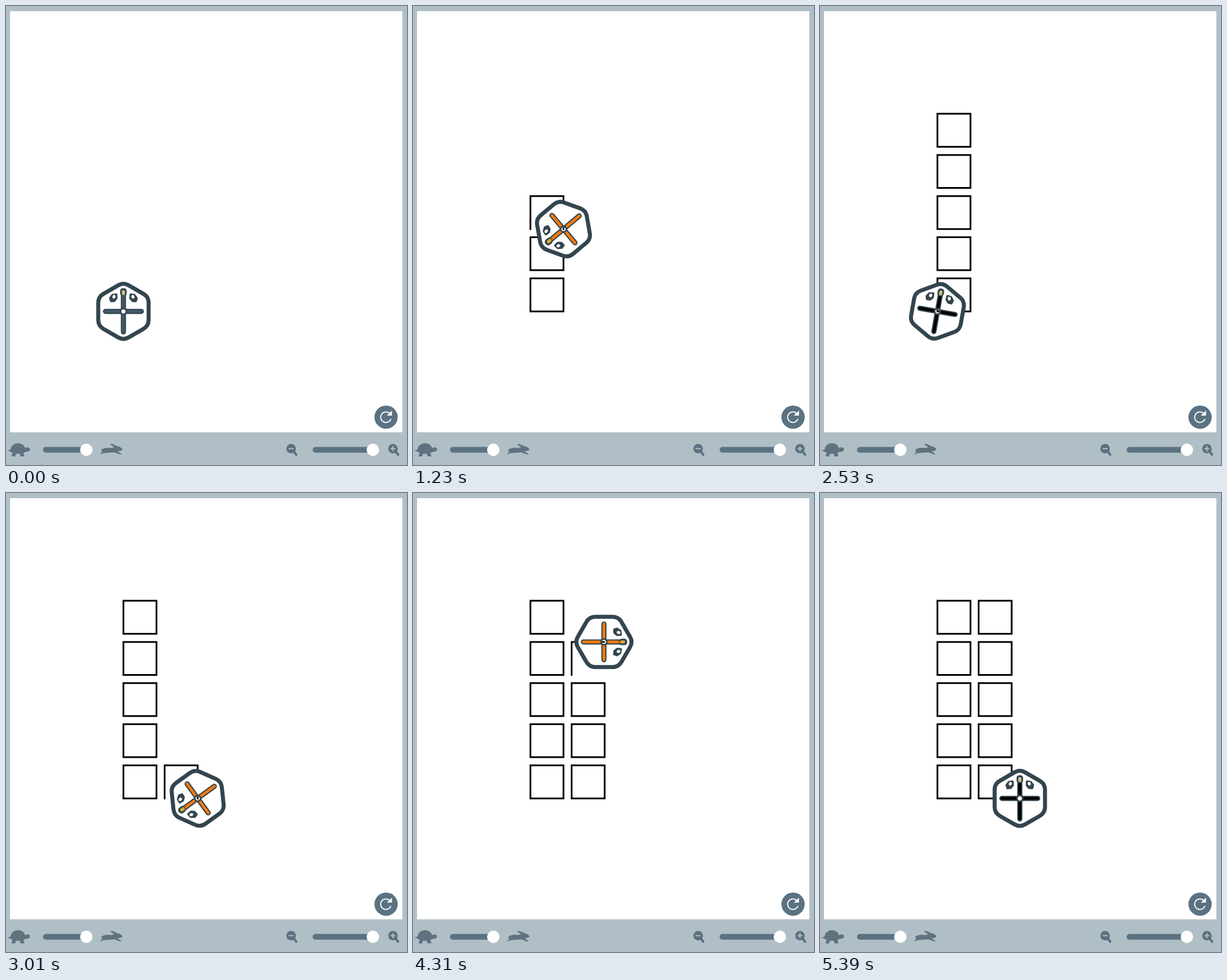
An HTML page for the animation above (6.25 s loop, 699 by 801 pixels).

```html
<!DOCTYPE html>
<html lang="en">
<head>
<meta charset="utf-8">
<title>Drawing robot</title>
<style>
  html, body { margin: 0; width: 100%; height: 100%; overflow: hidden; background: #b0bfc6; }
  svg { display: block; width: 100%; height: 100%; }
  .trail { fill: none; stroke: #000; stroke-width: 3; stroke-linecap: square; }
  .bar { fill: none; stroke-linecap: round; }
</style>
</head>
<body>
<svg viewBox="0 0 699 801">
  <defs>
    <clipPath id="hole"><circle id="holeShape" r="3.6"/></clipPath>
    <g id="eye">
      <path d="M-19-28.5L-12.7-29.3L-12.3-23L-16-18.5L-21.5-18L-23-23Z" fill="#33454e" stroke="#33454e" stroke-width="4" stroke-linejoin="round"/>
      <ellipse cx="-16.5" cy="-25.5" rx="2.6" ry="3.3" transform="rotate(15 -16.5 -25.5)" fill="#fff"/>
    </g>
    <g id="lens">
      <path d="M4 4L9 10.5" stroke="#5a7080" stroke-width="4" stroke-linecap="round"/>
      <circle r="8.3" fill="#5a7080"/>
    </g>
  </defs>
  <rect width="699" height="801" fill="#b0bfc6"/>
  <rect x="7" y="9" width="684" height="735" fill="#fff"/>

  <path id="trail" class="trail"/>
  <g id="robot">
    <path id="shell" fill="#fff" stroke="#33454e" stroke-width="7"/>
    <use href="#eye"/>
    <use href="#eye" transform="scale(-1 1)"/>
    <path class="bar" d="M-31.2 0H31.2M0-34V35.8" stroke="#33454e" stroke-width="9"/>
    <rect x="-5.7" y="-40.5" width="11.4" height="14" rx="5" fill="#33454e"/>
    <path id="lights" class="bar" d="M-31.2 0H31.2M0-25V35.8" stroke-width="4.8"/>
    <rect id="lamp" x="-2.7" y="-36.8" width="5.4" height="8.4" rx="2"/>
    <circle r="6.3" fill="#33454e"/>
    <circle r="3.6" fill="#fff"/>
  </g>
  <g clip-path="url(#hole)"><path id="trailInHole" class="trail"/></g>

  <circle cx="662.5" cy="717.5" r="20.3" fill="#5a7282"/>
  <path d="M669 711.2A9.2 9.2 0 1 0 671 720.5" fill="none" stroke="#fff" stroke-width="1.8"/>
  <path d="M663.8 714.8L672.8 706V714.8Z" fill="#fff"/>

  <path class="bar" d="M69.5 774.5H140M539.5 774.5H639" stroke="#5a7282" stroke-width="10"/>
  <circle cx="140" cy="774.5" r="10.7" fill="#fff"/>
  <circle cx="639.5" cy="774.5" r="10.7" fill="#fff"/>

  <g fill="#607280">
    <path d="M2.5 776L8 774C9 767 14 763 21 763C28 763 32 767 33.5 772C35 770 38 769.5 40.5 771C43 773 42 777 38.5 777.5L33 778.5L30.5 780L32 786H25.5L24 781.5H17L16 786H9.5L11.5 780L7.5 777.5Z"/>
    <path d="M163.5 783L168 777L165.5 775.5C169 771 176 770.5 182 771.5L189 770L183 766.5C181 765 183 764 186 764.5L195 768.5C199 769 203 772 203 774.5L199 776.5L194 777L201 781.5L200 783L189 779L179 779.5L169 780.5Z"/>
  </g>
  <use href="#lens" x="497" y="772.5"/>
  <use href="#lens" x="674.5" y="772.5"/>
  <path d="M492.5 772.5H501.5M670 772.5H679M674.5 768V777" stroke="#b0bfc6" stroke-width="2.2"/>
</svg>
<script>
const LOOP = 6250, TICK = 77, LAST_TICK = 70;
// Lengths in pixels.
const LEFT = 204.7, BOTTOM = 532.9, PITCH = 71.8, SIDE = 57.6, ROWS = 5;
// Durations in ticks.
const START = 1.38, MOVE = 0.45, CELL = 6.06, COLUMN = 35.1;
const SQUARE = 8 * MOVE, GAP_WAIT = 1.1, RETURN_WAIT = 1.73, BACK = 2;

const el = id => document.getElementById(id);
const ramp = (time, start, length) => Math.min(1, Math.max(0, (time - start) / length));

function roundedHexagon(halfWidth, radius) {
  const corner = halfWidth / Math.cos(Math.PI / 6);
  const cut = radius * Math.tan(Math.PI / 6) / corner;
  const vertex = k => [corner * Math.sin(k * Math.PI / 3), -corner * Math.cos(k * Math.PI / 3)];
  const toward = (a, b) => a.map((v, i) => (v + (b[i] - v) * cut).toFixed(2)).join(' ');
  let d = '';
  for (let k = 0; k < 6; k++) {
    const [before, at, after] = [vertex(k - 1), vertex(k), vertex(k + 1)];
    d += `${k ? 'L' : 'M'}${toward(at, before)}A${radius} ${radius} 0 0 1 ${toward(at, after)}`;
  }
  return d + 'Z';
}

const squareAt = (column, row) =>
  `M${LEFT + column * PITCH} ${BOTTOM - row * PITCH}v${-SIDE}h${SIDE}v${SIDE}h${-SIDE}z`;

function pose(tick) {
  const since = tick - START;
  const column = since < COLUMN ? 0 : 1;
  const inColumn = since - column * COLUMN;
  const row = Math.min(ROWS - 1, Math.max(0, Math.floor(inColumn / CELL)));
  const t = inColumn - row * CELL;
  const side = i => SIDE * ramp(t, 2 * i * MOVE, MOVE);
  const lengths = [0, 1, 2, 3].map(side);

  let x = LEFT + column * PITCH + lengths[1] - lengths[3];
  let y = BOTTOM - row * PITCH - lengths[0] + lengths[2];
  let heading = 0;
  for (let i = 0; i < 4; i++) heading += 90 * ramp(t, (2 * i + 1) * MOVE, MOVE);

  const rest = t - SQUARE;
  y -= PITCH * ramp(rest, GAP_WAIT, MOVE);
  if (row === ROWS - 1) {
    const turn = RETURN_WAIT + BACK;
    y += ROWS * PITCH * ramp(rest, RETURN_WAIT, BACK);
    x += PITCH * ramp(rest, turn + MOVE, MOVE);
    heading += 90 * (ramp(rest, turn, MOVE) - ramp(rest, turn + 2 * MOVE, MOVE));
  }

  let trail = '';
  for (let c = 0; c <= column; c++)
    for (let r = 0; r < (c < column ? ROWS : row); r++) trail += squareAt(c, r);
  if (rest >= 0) trail += squareAt(column, row);
  else if (t > 0) {
    trail += `M${LEFT + column * PITCH} ${BOTTOM - row * PITCH}`;
    const steps = [`v${-lengths[0]}`, `h${lengths[1]}`, `v${lengths[2]}`, `h${-lengths[3]}`];
    trail += steps.filter((_, i) => lengths[i] > 0).join('');
  }

  const lead = 0.3;
  const next = row < ROWS - 1 ? CELL : COLUMN - row * CELL;
  const penDown = (t > -lead && rest < MOVE) || t > next - lead;
  return { x, y, heading, trail, penDown };
}

function draw(time) {
  const tick = Math.min(LAST_TICK, Math.floor((time + 17) / TICK));
  const { x, y, heading, trail, penDown } = pose(tick);
  el('robot').setAttribute('transform', `translate(${x} ${y}) rotate(${heading})`);
  el('trail').setAttribute('d', trail);
  el('trailInHole').setAttribute('d', trail);
  el('holeShape').setAttribute('cx', x);
  el('holeShape').setAttribute('cy', y);
  el('lights').setAttribute('stroke', penDown ? '#f27a0c' : tick ? '#000' : '#435a66');
  el('lamp').setAttribute('fill', penDown ? '#dfa92c' : '#d0c078');
}

el('shell').setAttribute('d', roundedHexagon(43.9, 18));
const begin = performance.now();
function loop() {
  draw((performance.now() - begin) % LOOP);
  requestAnimationFrame(loop);
}
loop();
</script>
</body>
</html>
```
